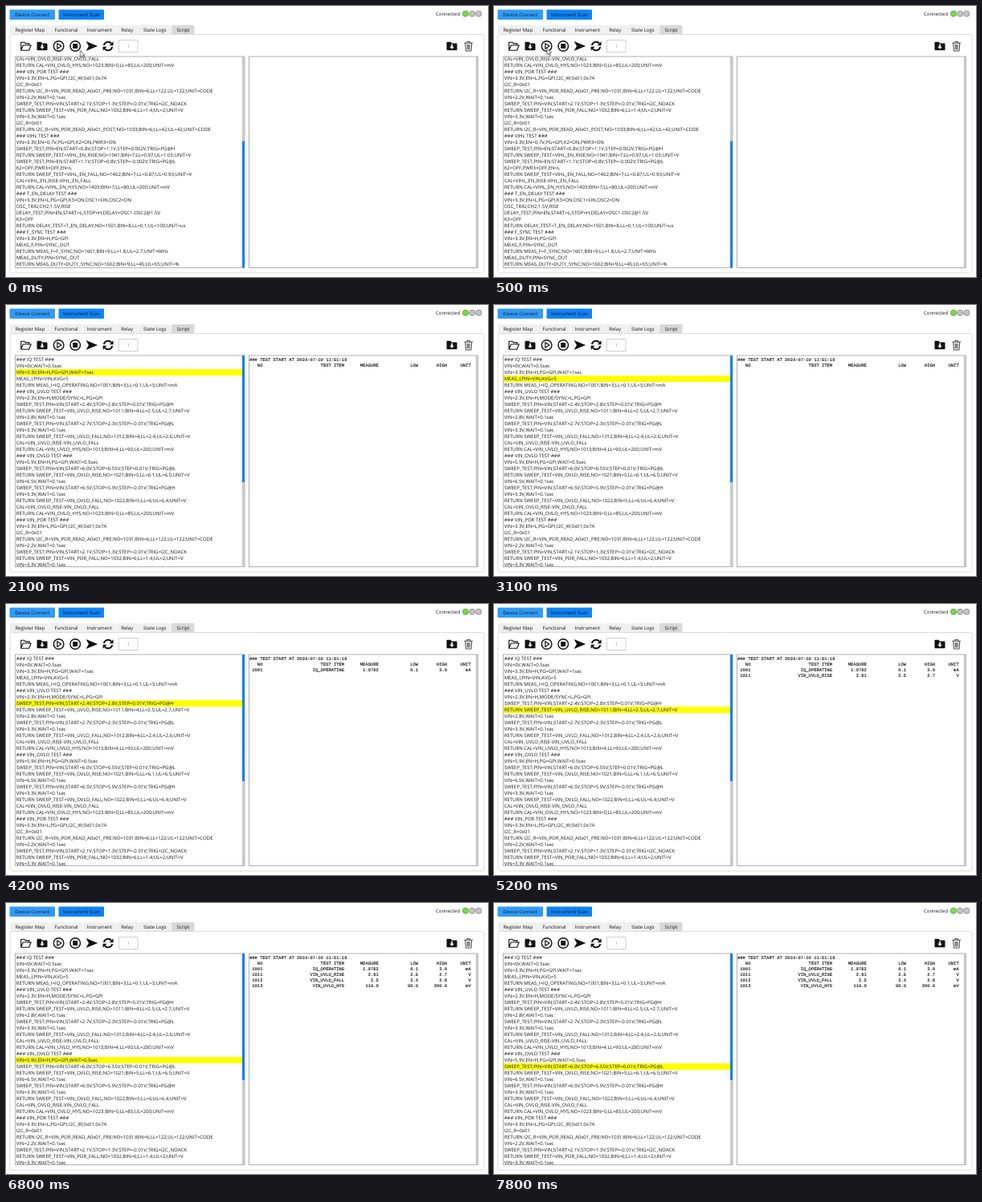
These frames come from a looping animation (600x338 px, 8 s). An HTML page:

```html
<!DOCTYPE html>
<html lang="en">
<head>
<meta charset="utf-8">
<title>Instrument scan</title>
<style>
html, body { margin: 0; width: 100%; height: 100%; overflow: hidden; background: #fff; }
svg { display: block; width: 100vw; height: 100vh; }
text {
  font: 6px "Open Sans", "Noto Sans", sans-serif;
  font-kerning: none;
  text-rendering: geometricPrecision;
  white-space: pre;
  fill: #161616;
}
.mid { text-anchor: middle; }
#log text { font: 5.473px "Liberation Mono", monospace; stroke: #161616; stroke-width: .14px; }
.ink { fill: none; stroke: #111; stroke-width: 1.4; stroke-linejoin: round; stroke-linecap: round; }
.solid { fill: #111; }

#list, #thumb, #mark, #pointer, .late { animation: 8s step-end infinite; }
#list { animation-name: list; }
#thumb { animation-name: thumb; }
#mark { animation-name: mark; }
#pointer { animation-name: pointer; }
.r1 { animation-name: start !important; }
.r2 { animation-name: iq !important; }
.r3 { animation-name: rise !important; }
.r4 { animation-name: fall !important; }
.r5 { animation-name: hys !important; }

@keyframes list { 0% { transform: translateY(-186px); } 10%, 100% { transform: none; } }
@keyframes thumb { 0% { transform: translateY(105.5px); } 10%, 100% { transform: none; } }
@keyframes start { 0% { opacity: 0; } 10%, 100% { opacity: 1; } }
@keyframes iq { 0% { opacity: 0; } 52.5%, 100% { opacity: 1; } }
@keyframes rise { 0% { opacity: 0; } 65%, 100% { opacity: 1; } }
@keyframes fall { 0% { opacity: 0; } 81.25%, 100% { opacity: 1; } }
@keyframes hys { 0% { opacity: 0; } 85%, 100% { opacity: 1; } }
@keyframes mark {
  0% { opacity: 0; transform: translateY(8px); }
  10% { opacity: 1; transform: translateY(8px); }
  16.25% { transform: translateY(16px); }
  32.5% { transform: translateY(24px); }
  52.5% { transform: translateY(56px); }
  65% { transform: translateY(64px); }
  66.25% { transform: translateY(72px); }
  71.25% { transform: translateY(80px); }
  81.25% { transform: translateY(96px); }
  82.5% { transform: translateY(104px); }
  85% { transform: translateY(128px); }
  91.25%, 100% { opacity: 1; transform: translateY(136px); }
}
@keyframes pointer {
  0% { opacity: 1; transform: translate(92.5px, 55.5px); }
  1.25% { transform: translate(90px, 55.2px); }
  2.5% { transform: translate(83px, 54.4px); }
  3.75% { transform: translate(75px, 53.5px); }
  5% { transform: translate(68px, 52.7px); }
  6.25% { opacity: 1; transform: translate(65.8px, 52.5px); }
  11.25%, 100% { opacity: 0; transform: translate(65.8px, 52.5px); }
}
</style>
</head>
<body>
<svg viewBox="0 0 600 338" preserveAspectRatio="none">
  <defs>
    <clipPath id="view"><rect x="12" y="63.5" width="282" height="262.5"/></clipPath>
    <g id="save">
      <path class="solid" d="M-6.5-4.3q0-1 1-1H-1.5L0-3.6H5.5q1 0 1 1V4.3q0 1-1 1H-5.5q-1 0-1-1Z"/>
      <path d="M-.9-2.2H.9V.7H2.9L0 3.7-2.9.7H-.9Z" fill="#fff"/>
    </g>
  </defs>
  <rect width="600" height="338" fill="#fff"/>

  <!-- header -->
  <rect x="4.5" y="4.5" width="56.5" height="12.5" rx="1" fill="#2f9bfb"/>
  <rect x="65.5" y="4.5" width="56.5" height="12.5" rx="1" fill="#0d83f7"/>
  <text class="mid" x="32.8" y="13">Device Connect</text>
  <text class="mid" x="94" y="13">Instrument Scan</text>
  <text x="535" y="12">Connected</text>
  <g stroke="#777" stroke-width=".7">
    <circle cx="572" cy="9.7" r="3.6" fill="#6fe23c"/>
    <circle cx="580.2" cy="9.7" r="3.6" fill="#c4c4c4"/>
    <circle cx="588.3" cy="9.7" r="3.6" fill="#c4c4c4"/>
  </g>

  <!-- tabs and panel -->
  <g id="tabs"></g>
  <rect x="5" y="35.5" width="590" height="297.5" rx="1.5" fill="#fff" stroke="#dcdcdc"/>

  <!-- toolbar -->
  <path class="ink" style="stroke-width:1.1" d="M18.7 55.2V45.2H22.6L24.2 46.9H29V49M18.7 55.2 21.2 49H31.2L28.6 55.2Z"/>
  <use href="#save" x="45" y="50"/>
  <circle class="ink" cx="65.6" cy="50" r="6.3"/>
  <path class="ink" style="stroke-width:1.2" d="M63.8 46.7 68.9 50 63.8 53.3Z"/>
  <circle class="ink" cx="86.2" cy="50" r="6.3"/>
  <rect class="solid" x="83.2" y="47" width="6" height="6" rx=".5"/>
  <path class="solid" d="M99.6 44 114.2 50 99.6 56 103 50Z"/>
  <g id="sync">
    <path class="ink" style="stroke-width:1.9;stroke-linecap:butt" d="M121.9 49A5.3 5.3 0 0 1 131.2 46.7M132.3 51A5.3 5.3 0 0 1 123 53.3"/>
    <path class="solid" d="M133.6 44.2V49.2H128.6ZM120.6 55.8V50.8H125.6Z"/>
  </g>
  <rect x="140.5" y="42.5" width="23.5" height="15" fill="#fff" stroke="#d0d0d0"/>
  <text class="mid" x="152.2" y="52.2" style="fill:#999">1</text>
  <use href="#save" x="555" y="50"/>
  <path class="ink" style="stroke:#4a4a4a;stroke-width:1" d="M570.8 46.2H580.6M573.8 46V44.4H577.6V46M571.7 46.4 572.3 56H579.1L579.7 46.4M574.2 48.4V54M575.7 48.4V54M577.2 48.4V54"/>

  <!-- script list -->
  <rect x="11.5" y="63" width="285.5" height="263.5" fill="#fff" stroke="#a8a8a8" stroke-width=".9"/>
  <rect id="mark" x="12" y="64" width="282" height="8" fill="#ff0"/>
  <g clip-path="url(#view)"><g id="list"></g></g>
  <rect x="294" y="63" width="3" height="263.5" fill="#c9c9c9"/>
  <rect id="thumb" x="294" y="63" width="3" height="158" fill="#0d83f7"/>

  <!-- result log -->
  <rect x="302.5" y="63" width="285" height="263.5" fill="#fff" stroke="#a8a8a8" stroke-width=".9"/>
  <rect x="584.8" y="63" width="2.7" height="263.5" fill="#c9c9c9"/>
  <g id="log"></g>

  <path id="pointer" d="M0 0V8.2L1.9 6.5 3.2 9.4 4.5 8.8 3.2 6H5.7Z" fill="#fff" stroke="#222" stroke-width=".7"/>
</svg>
<script>
const script = `### IQ TEST ###
VIN=0V,WAIT=0.5sec
VIN=3.3V,EN=H,PG=GPI,WAIT=1sec
MEAS_I;PIN=VIN;AVG=5
RETURN MEAS_I=IQ_OPERATING;NO=1001;BIN=3;LL=0.1;UL=3;UNIT=mA
### VIN_UVLO TEST ###
VIN=2.3V,EN=H,MODE/SYNC=L,PG=GPI
SWEEP_TEST;PIN=VIN;START=2.4V;STOP=2.8V;STEP=0.01V;TRIG=PG@H
RETURN SWEEP_TEST=VIN_UVLO_RISE;NO=1011;BIN=4;LL=2.5;UL=2.7;UNIT=V
VIN=2.8V,WAIT=0.1sec
SWEEP_TEST;PIN=VIN;START=2.7V;STOP=2.3V;STEP=-0.01V;TRIG=PG@L
VIN=3.3V,WAIT=0.1sec
RETURN SWEEP_TEST=VIN_UVLO_FALL;NO=1012;BIN=4;LL=2.4;UL=2.6;UNIT=V
CAL=VIN_UVLO_RISE-VIN_UVLO_FALL
RETURN CAL=VIN_UVLO_HYS;NO=1013;BIN=4;LL=90;UL=200;UNIT=mV
### VIN_OVLO TEST ###
VIN=5.9V,EN=H,PG=GPI,WAIT=0.5sec
SWEEP_TEST;PIN=VIN;START=6.0V;STOP=6.55V;STEP=0.01V;TRIG=PG@L
RETURN SWEEP_TEST=VIN_OVLO_RISE;NO=1021;BIN=5;LL=6.1;UL=6.5;UNIT=V
VIN=6.5V,WAIT=0.1sec
SWEEP_TEST;PIN=VIN;START=6.5V;STOP=5.9V;STEP=-0.01V;TRIG=PG@H
VIN=3.3V,WAIT=0.1sec
RETURN SWEEP_TEST=VIN_OVLO_FALL;NO=1022;BIN=5;LL=6;UL=6.4;UNIT=V
CAL=VIN_OVLO_RISE-VIN_OVLO_FALL
RETURN CAL=VIN_OVLO_HYS;NO=1023;BIN=5;LL=85;UL=200;UNIT=mV
### VIN_POR TEST ###
VIN=3.3V,EN=L,PG=GPI,I2C_W;0x01;0x7A
I2C_R=0x01
RETURN I2C_R=VIN_POR_READ_A0x01_PRE;NO=1031;BIN=6;LL=122;UL=122;UNIT=CODE
VIN=2.2V,WAIT=0.1sec
SWEEP_TEST;PIN=VIN;START=2.1V;STOP=1.3V;STEP=-0.01V;TRIG=I2C_NOACK
RETURN SWEEP_TEST=VIN_POR_FALL;NO=1032;BIN=6;LL=1.4;UL=2;UNIT=V
VIN=3.3V,WAIT=0.1sec
I2C_R=0x01
RETURN I2C_R=VIN_POR_READ_A0x01_POST;NO=1033;BIN=6;LL=42;UL=42;UNIT=CODE
### VIHL TEST ###
VIN=3.3V,EN=0.7V,PG=GPI,K2=ON,PWR3=ON
SWEEP_TEST;PIN=EN;START=0.8V;STOP=1.1V;STEP=0.002V;TRIG=PG@H
RETURN SWEEP_TEST=VIHL_EN_RISE;NO=1041;BIN=7;LL=0.97;UL=1.03;UNIT=V
SWEEP_TEST;PIN=EN;START=1.1V;STOP=0.8V;STEP=-0.002V;TRIG=PG@L
K2=OFF,PWR3=OFF,EN=L
RETURN SWEEP_TEST=VIHL_EN_FALL;NO=1402;BIN=7;LL=0.87;UL=0.93;UNIT=V
CAL=VIHL_EN_RISE-VIHL_EN_FALL
RETURN CAL=VIHL_EN_HYS;NO=1403;BIN=7;LL=80;UL=200;UNIT=mV
### T_EN_DELAY TEST ###
VIN=3.3V,EN=L,PG=GPI,K3=ON,OSC1=ON,OSC2=ON
OSC_TRIG;CH2;1.5V;RISE
DELAY_TEST;PIN=EN;START=L;STOP=H;DELAY=OSC1-OSC2@1.5V
K3=OFF
RETURN DELAY_TEST=T_EN_DELAY;NO=1501;BIN=8;LL=0.1;UL=100;UNIT=us
### F_SYNC TEST ###
VIN=3.3V,EN=H,PG=GPI
MEAS_F;PIN=SYNC_OUT
RETURN MEAS_F=F_SYNC;NO=1601;BIN=9;LL=1.8;UL=2.7;UNIT=MHz
MEAS_DUTY;PIN=SYNC_OUT
RETURN MEAS_DUTY=DUTY_SYNC;NO=1602;BIN=9;LL=45;UL=55;UNIT=%`;

const pads = [5, 31, 13, 15, 11, 9];
const row = line => line.split(",").map((cell, i) => cell.padStart(pads[i])).join("");

function add(parent, tag, attrs, content = "") {
  const node = document.createElementNS("http://www.w3.org/2000/svg", tag);
  for (const key in attrs) node.setAttribute(key, attrs[key]);
  node.textContent = content;
  parent.append(node);
}

const byId = id => document.getElementById(id);

script.split("\n").forEach((line, i) =>
  add(byId("list"), "text", { x: 12.7, y: 70.2 + 8 * i }, line));

[
  ["### TEST START AT 2024-07-10 11:51:16", 1],
  [row("NO,TEST ITEM,MEASURE,LOW,HIGH,UNIT"), 1],
  [row("1001,IQ_OPERATING,1.8762,0.1,3.0,mA"), 2],
  [row("1011,VIN_UVLO_RISE,2.61,2.5,2.7,V"), 3],
  [row("1012,VIN_UVLO_FALL,2.5,2.4,2.6,V"), 4],
  [row("1013,VIN_UVLO_HYS,110.0,90.0,200.0,mV"), 5]
].forEach(([line, step], i) =>
  add(byId("log"), "text", { x: 303, y: 69.9 + 7 * i, class: "late r" + step }, line));

const edges = [5, 54.5, 95.5, 137, 164.5, 206, 235];
["Register Map", "Functional", "Instrument", "Relay", "State Logs", "Script"].forEach((name, i) => {
  const x = edges[i], w = edges[i + 1] - x;
  add(byId("tabs"), "path", {
    d: `M${x} 35.5V25.5q0-1.5 1.5-1.5h${w - 3.5}q1.5 0 1.5 1.5V35.5Z`,
    fill: i == 5 ? "#d8d8d8" : "#efefef"
  });
  add(byId("tabs"), "text", { class: "mid", x: x + w / 2, y: 32 }, name);
});
</script>
</body>
</html>
```
